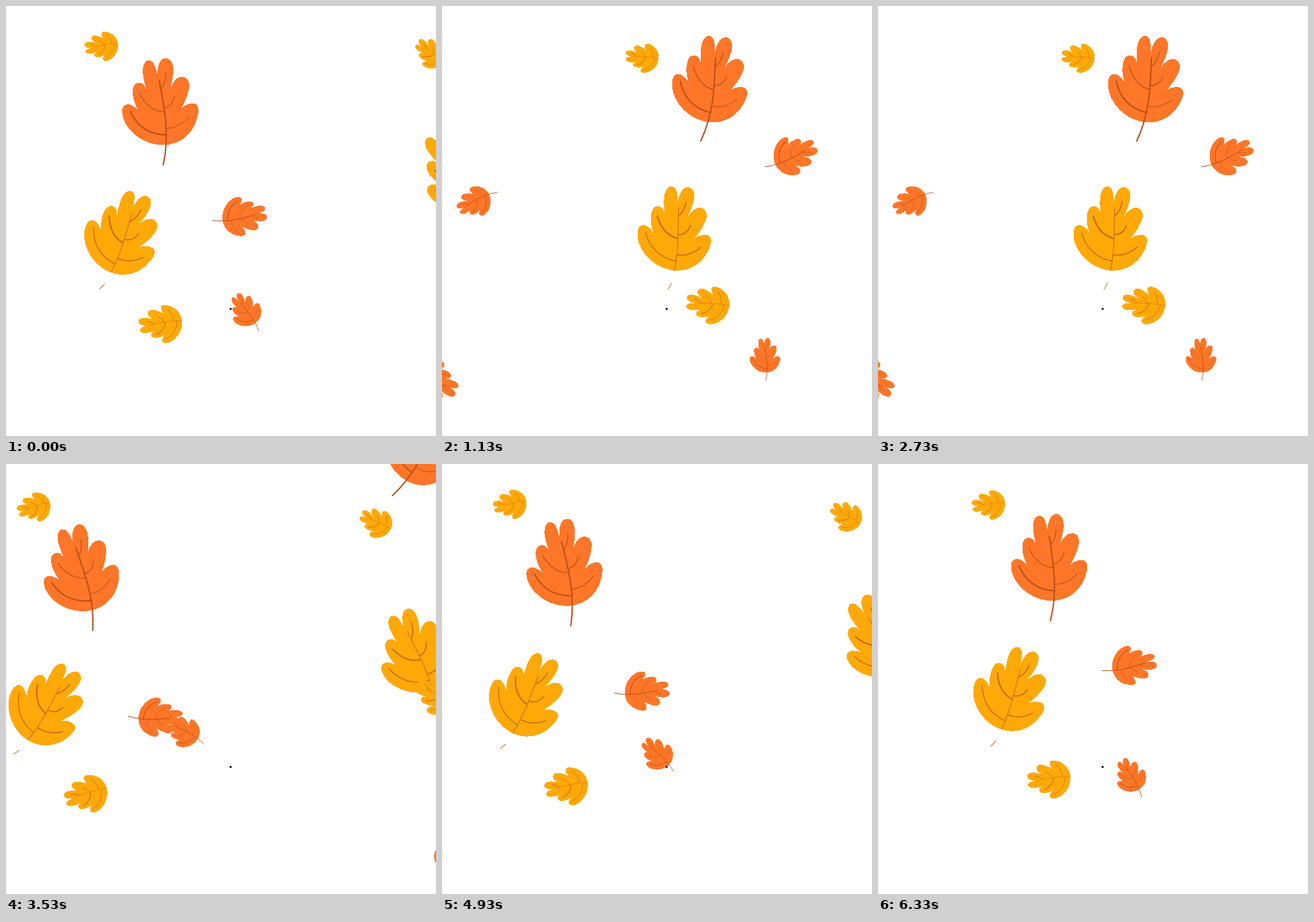
These frames come from a looping animation (648 by 648 pixels, 6410 ms). An HTML page:

```html
<!DOCTYPE html>
<html lang="en">
<head>
<meta charset="utf-8">
<title>Drifting leaves</title>
<style>
  html, body { margin: 0; width: 100%; height: 100%; overflow: hidden; background: #fff; }
  svg { display: block; width: 100vw; height: 100vh; }
  .blade { shape-rendering: crispEdges; }
  .vein { fill: none; stroke-linecap: round; }
</style>
</head>
<body>
<svg id="stage" viewBox="0 0 648 648"></svg>
<script>
const LOOP = 6410, CYCLE = 1600;
const KEY_START = -70, KEY_GAP = 400;

const BLADE = `M3,65 C-30,65 -58,38 -58,14 C-58,4 -50,2 -44,5 Q-38,8 -34,12
  C-40,2 -42,-8 -42,-16 C-42,-29 -33,-31 -27,-27 Q-24,-25 -22,-20
  C-25,-30 -27,-42 -27,-48 C-26,-66 -13,-66 -9,-55 Q-6,-47 -5,-41
  C-5,-56 0,-66 8,-66 C17,-66 20,-54 19,-44 Q18,-33 15,-22
  C20,-33 26,-38 33,-38 C42,-37 45,-28 42,-17 Q39,-4 31,10
  C38,3 45,2 50,2 C57,3 58,12 56,20 C51,46 31,65 3,65Z`;
const VEINS = {
  stem: 'M-2,-32 C6,10 14,50 4,95',
  rib: 'M-2,-32 C3,0 10,33 8.5,64',
  tail: 'M7.5,85 Q6,90 4,95',
  lowLeft: 'M-46,14 Q-30,49 9,50',
  midLeft: 'M-32,-13 Q-18,14 5,15',
  topRight: 'M8,-43 Q8,-29 1,-20',
  midRight: 'M21,-8 Q18,7 5,9',
  lowRight: 'M43,22 Q28,40 9,40'
};
const ORANGE = { fill: '#ff7628', line: '#b94f17',
  widths: { stem: 2, lowLeft: 2, midLeft: 1.2, topRight: 1.2, midRight: 1.2, lowRight: 1 } };
const YELLOW = { fill: '#ffa908', line: '#c5660b',
  widths: { rib: 1, lowLeft: 1.4, midLeft: 2.1, topRight: 1.7, midRight: 1.6, lowRight: 1.5 } };
const YELLOW_TAIL = { ...YELLOW, widths: { ...YELLOW.widths, tail: 1 } };

// Keys are KEY_GAP apart; "first" is the index of a leaf's first key.
const leaves = [
  { look: YELLOW_TAIL, scale: .975, first: 0,
    x: [692, 616, 494, 353, 203.5, 64.5, -41, -110],
    y: [236, 282, 320, 335, 339, 361, 411, 480],
    turn: spin(26, .034) },
  { look: ORANGE, scale: 1, first: 0,
    x: [690, 633, 537, 407, 259, 112, -15, -105],
    y: [-130, -33, 46, 110, 141, 157.5, 191, 245],
    turn: spin(0, -.0272) },
  { look: YELLOW, scale: .387, first: 0,
    x: [657, 557, 435.5, 301.5, 166.5, 42, -62],
    y: [66, 87.5, 91.5, 77.5, 61.5, 65.5, 88],
    turn: spin(-92, -.027) },
  { look: YELLOW, scale: .5, first: 0,
    x: [730, 647, 534, 400.5, 257.5, 120.5, 3, -90],
    y: [265, 347, 406, 449.5, 475, 498, 529, 575],
    turn: spin(-91, -.027) },
  { look: ORANGE, scale: .515, first: 1,
    x: [735, 652, 532.5, 386, 233, 96, -8, -80],
    y: [35, 135, 224, 303, 382.5, 469.5, 566, 670],
    turn: spin(85, .031) },
  { look: ORANGE, scale: .4, first: 0,
    x: [735, 670, 587, 487, 379.5, 266, 154.5, 48, -55],
    y: [600, 590, 568, 526.5, 468.5, 402, 340.5, 296, 270],
    turn: pos => spline([48, 35, 20, 1, -25.5, -56, -86, -111, -135], pos) }
];

function spin(angle, rate) {
  return pos => angle + rate * (KEY_START + pos * KEY_GAP - CYCLE);
}

function spline(keys, pos) {
  const i = Math.min(Math.floor(pos), keys.length - 2), u = pos - i;
  const b = keys[i], c = keys[i + 1];
  const a = i > 0 ? keys[i - 1] : 2 * b - c;
  const d = i + 2 < keys.length ? keys[i + 2] : 2 * c - b;
  return b + u / 2 * (c - a + u * (2 * a - 5 * b + 4 * c - d + u * (3 * (b - c) + d - a)));
}

function add(parent, tag, attrs) {
  const node = document.createElementNS('http://www.w3.org/2000/svg', tag);
  for (const name in attrs) node.setAttribute(name, attrs[name]);
  return parent.appendChild(node);
}

function drawLeaf(look) {
  const group = add(stage, 'g', {});
  add(group, 'path', { class: 'blade', d: BLADE, fill: look.fill });
  for (const name in look.widths)
    add(group, 'path', { class: 'vein', d: VEINS[name], stroke: look.line, 'stroke-width': look.widths[name] });
  return group;
}

const stage = document.getElementById('stage');
// Each leaf's flight outlasts one cycle, so two copies overlap.
for (const leaf of leaves) leaf.copies = [drawLeaf(leaf.look), drawLeaf(leaf.look)];
add(stage, 'rect', { x: 337, y: 455, width: 3, height: 3, fill: '#2b2024' });

function place(leaf, node, age) {
  const pos = (age - KEY_START) / KEY_GAP, local = pos - leaf.first;
  const shown = local >= 0 && local <= leaf.x.length - 1;
  node.style.display = shown ? '' : 'none';
  if (!shown) return;
  const x = spline(leaf.x, local), y = spline(leaf.y, local);
  node.setAttribute('transform',
    `translate(${x.toFixed(2)} ${y.toFixed(2)}) rotate(${leaf.turn(pos).toFixed(2)}) scale(${leaf.scale})`);
}

// The picture steps at 0 and 30 ms of every 100 ms.
function step(ms) {
  const t = Math.min(ms % LOOP, 6399), base = Math.floor(t / 100) * 100;
  return base + (t - base >= 30 ? 30 : 0);
}

function render(ms) {
  const phase = step(ms) % CYCLE;
  for (const leaf of leaves)
    leaf.copies.forEach((node, n) => place(leaf, node, phase + n * CYCLE));
}

let start;
function tick(now) {
  start ??= now;
  render(now - start);
  requestAnimationFrame(tick);
}
render(0);
requestAnimationFrame(tick);
</script>
</body>
</html>
```
